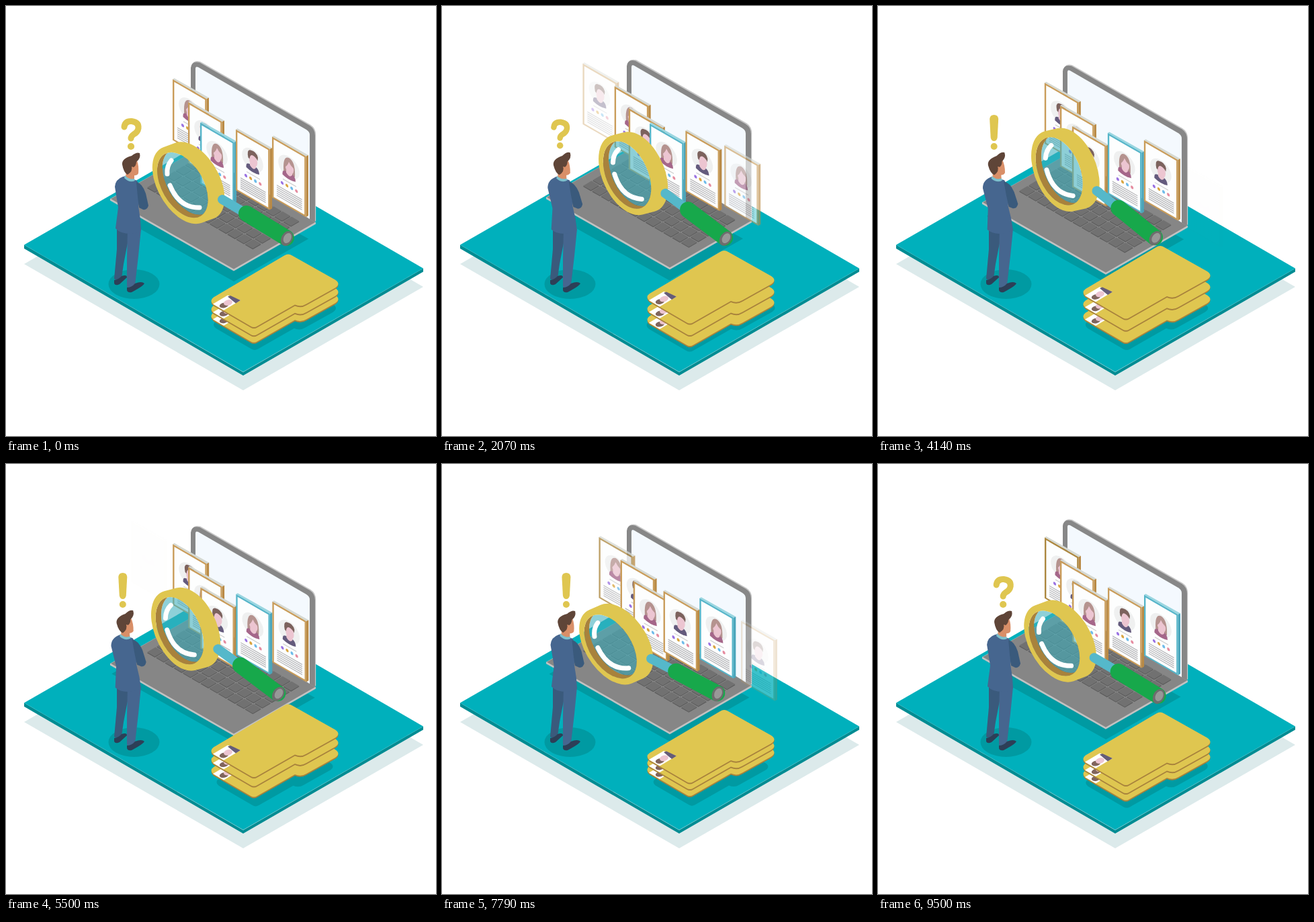
An HTML page that plays this animation: 640 px wide and 640 px high, repeating every 9.57 s.

```html
<!DOCTYPE html>
<html lang="en">
<head>
<meta charset="utf-8">
<title>Candidate search</title>
<style>
  html, body { margin: 0; width: 100%; height: 100%; overflow: hidden; background: #fff; }
  svg { display: block; width: 100vw; height: 100vh; }
</style>
</head>
<body>
<svg id="stage" viewBox="0 0 640 640"></svg>
<script>
const LOOP = 9570, FPS = 14;
const GOLD = '#dfc650', DARK_GOLD = '#a8823c', SHADE = '#009aa2';
const stage = document.getElementById('stage');

const poly = (points, fill) => `<polygon points="${points}" fill="${fill}"/>`;
const path = (d, fill) => `<path d="${d}" fill="${fill}"/>`;
const line = (d, color, width, cap = 'round') =>
  `<path d="${d}" fill="none" stroke="${color}" stroke-width="${width}" stroke-linecap="${cap}" stroke-linejoin="round"/>`;
const oval = (x, y, rx, ry, fill, turn = 0) =>
  `<ellipse cx="${x}" cy="${y}" rx="${rx}" ry="${ry}" fill="${fill}" transform="rotate(${turn} ${x} ${y})"/>`;
const group = (id, body) => `<g id="${id}">${body}</g>`;

function floor() {
  return poly('27,384 295,230 621,418 353,572', '#dceaeb')
    + poly('27,355.5 353,545 621,390.5 621,395.5 353,550 27,361', '#008c93')
    + poly('27,355.5 295,201.5 621,390.5 353,544.5', '#00b0bc')
    + oval(190.5, 414, 38, 22, SHADE);
}

function keyboard() {
  let keys = '';
  for (let row = 0; row < 5; row++) {
    for (let col = 0; col < 12; col++) {
      const x = 209 + col * 13.25 + row * 14.2;
      const y = 270 + col * 7.67 - row * 8.4;
      keys += `M${x + 1},${y}l11.6,6.7 12.4,-7.3 -11.6,-6.7z`;
    }
  }
  return `<path d="${keys}" transform="translate(0 1.1)" fill="#595959"/>` + path(keys, '#717171');
}

function laptop() {
  const lid = 'M275,222V92Q276,81 288,84L452,178Q460,183 460,193V322Z';
  return poly('155,287 277,218 461,322 461,324.5 339,394.5 155,289.5', '#c2c2c2')
    + poly('156,287 277,218 460,322 339,391.5', '#868686')
    + `<g transform="translate(1.2 -1.3)">${path(lid, '#c6c6c6')}</g>`
    + path(lid, '#878787')
    + path('M282,213V93Q282,89 286,91L447,184Q452,187 452,192V317Z', '#f4f9fe')
    + keyboard();
}

function portrait(woman) {
  const hair = woman ? '#b5938f' : '#7c625d';
  const back = woman ? path('M17.5,44Q15,19 25,17Q35,17 34,40L32,43Z', hair) : '';
  const fringe = woman
    ? 'M19,34Q18,18 26,19Q33,20 32,29Q27,27 25,23Q23,30 19,34Z'
    : 'M18.5,31Q16,20 22,18Q31,15 33,23L32.5,28Q30,24 25,24Q21,25 20.5,32Z';
  return back
    + path('M15.5,47Q15,40 20,39.5L31,39Q35,41 35,47Q25,51 15.5,47Z', woman ? '#a5678a' : '#645b7d')
    + path('M21,37H30V40Q26,47 21,41Z', '#ecc5d1')
    + oval(26, 31.5, 6.2, 8.8, '#ecc5d1')
    + path(fringe, hair);
}

function card(index) {
  const blue = index === 2;
  const frame = blue ? '#55b5c9' : index === -2 ? '#ac873f' : '#c99c59';
  const dots = ['#9a72e2', '#d9a540', '#6fbbe9', '#e58ca0'];
  let face = `<rect width="50.5" height="90.5" fill="${frame}"/>`
    + '<rect x="2.4" y="2.6" width="45.8" height="85.6" fill="#fdfefe"/>'
    + oval(25, 31, 15.8, 16, '#eff0f0') + portrait(index % 2 === 0)
    + line('M16,53.5H36', '#c9c9c9', 1.2, 'butt');
  dots.forEach((color, i) => face += oval(15 + i * 7.1, 60, 2.1, 2.3, color));
  for (let i = 0; i < 6; i++) face += line(`M7,${68 + i * 3}H44.5`, '#b5b5b8', 1.4, 'butt');
  return group('card' + index,
    poly('0,0 2.5,-1.5 54,27.5 50.5,29.2', blue ? '#9ad6e0' : '#d5d9d3')
    + poly('50.5,29.2 54,27.5 54,117.5 50.5,119.7', blue ? '#4aa6bb' : '#b98a45')
    + `<g transform="matrix(1 .577 0 1 0 0)">${face}</g>`);
}

function man() {
  const suit = '#46668f', dark = '#3a5a7c', shoe = '#2d3f57', hair = '#5f4538', skin = '#d98f68';
  const legs = path('M165,328L185,334L180,358L175,384L172,405Q166,410 161,406L165,362Z', dark)
    + path('M161,408Q168,407 172,402Q180,399 180,404L169,414Q163,417 161,413Z', shoe)
    + path('M181,330L201,332L197,372L192,415Q185,421 180,418L180,376Z', suit)
    + path('M180,419Q187,419 192,413Q202,409 206,413Q204,417 187,426Q181,427 180,423Z', shoe);
  const body = path('M178,253Q163,256 162,269L167,300L163,331Q170,339 186,339Q196,339 201,334L200,318L197,298L202,275L195,260Z', suit)
    + path('M194,262Q203,264 208,279L212,297Q210,304 204,303L198,300L196,284Z', dark)
    + path('M179,246L191,249V258Q184,262 178,254Z', skin)
    + path('M177,252Q183,259 191,257L192,260Q184,264 176,256Z', '#7cc0cd')
    + path('M184,236L195,230Q198,238 197,249Q195,253 188,252L183,247Z', skin)
    + path('M173,236Q172,227 187,223Q194,217 199,219Q201,227 194,232Q194,237 190,240L187,239Q189,246 181,251Q175,248 173,236Z', hair);
  return legs + group('body', body);
}

function marks() {
  return group('ask', line('M176,180Q177,171 187,171.5Q198,173 197,182Q196,188 190,191Q186,194 186,197', GOLD, 9)
      + oval(186, 209, 5.1, 5, GOLD))
    + group('shout', path('M179.5,168Q180,162 186,162Q192,162 192.5,168L191,196Q190,201 186,201Q182,201 181,196Z', GOLD)
      + oval(186, 209, 5, 5, GOLD));
}

// The ring is a capsule in a skewed plane, so its depth is one thick round line.
function magnifier() {
  const plane = 'transform="matrix(.87 .5 0 1 262.8 266.5)"';
  const hole = '<circle r="43.5"';
  return `<defs><clipPath id="hole">${hole}/></clipPath>
    <mask id="cut" maskUnits="userSpaceOnUse" x="-90" y="-90" width="200" height="200">
      <rect x="-90" y="-90" width="200" height="200" fill="#fff"/>${hole} fill="#000"/></mask></defs>
    <g ${plane}>
      <g clip-path="url(#hole)">
        <circle cx="9" cy="-9" r="43.5" fill="#44b1be" fill-opacity=".6"/>
        <path fill="${DARK_GOLD}" fill-rule="evenodd" d="M-60,-60H60V60H-60ZM-34.5,-9a43.5,43.5 0 1 0 87,0a43.5,43.5 0 1 0 -87,0Z"/>
      </g>
    </g>`
    + line('M240,250Q239,238 246,230', '#fff', 7)
    + line('M244,267Q258,301 288,300', '#fff', 7)
    + `<g ${plane}><g mask="url(#cut)">${line('M0,0L20.2,-16.6', GOLD, 103.4)}</g></g>`
    + line('M322,288L356,308', '#55b8ca', 14)
    + line('M358,309L417,345', '#17a84b', 24)
    + oval(418, 346, 8.2, 11.5, '#6d6d6d', 27) + oval(418.8, 345.5, 5.5, 8, '#989898', 27);
}

const FOLDER = 'M309,433L414,371Q420,367 426,371L490,407Q499,413 490,419L447,443Q439,448 430,444L374,476Q369,479 364,476L309,444Q302,438 309,433Z';

function folder(id) {
  return group(id, `<g transform="translate(0 2)">${path(FOLDER, DARK_GOLD)}</g>`
    + path(FOLDER, GOLD)
    + poly('308,443 330,430 349,437.5 324,452.5', '#fff')
    + poly('330,432 334,430.5 349,437.5 342,442 337,438', '#655c78')
    + oval(324.5, 445, 6.8, 3.8, '#80655d', -12)
    + oval(330.5, 441, 6.6, 4.2, '#ecc5d1', -15));
}

const indexes = [-2, -1, 0, 1, 2, 3, 4];
stage.innerHTML = floor()
  + group('baseShade', poly('163,313 277,248 454,347 340,412', SHADE))
  + group('laptop', laptop() + indexes.map(card).join(''))
  + group('lens', magnifier())
  + man() + marks()
  + group('fileShade', path(FOLDER, SHADE))
  + folder('file2') + folder('file1') + folder('file0');

const parts = {};
stage.querySelectorAll('g[id]').forEach(g => parts[g.id] = g);
const place = (id, value) => parts[id].setAttribute('transform', value);

const wave = (t, peak) => Math.cos(2 * Math.PI * (t - peak) / LOOP);
const clamp = x => Math.min(1, Math.max(0, x));
const ramp = (t, a, b) => { const p = clamp((t - a) / (b - a)); return p * p * (3 - 2 * p); };
const cubic = (t, a, b) => {
  const p = clamp((t - a) / (b - a));
  return p < .5 ? 4 * p ** 3 : 1 - 4 * (1 - p) ** 3;
};

// Smooth closed curve through poses at the key times.
const KEYS = [0, 1140, 2930, 5500, 7000, 8710];
const TRACKS = {
  x: [271.5, 279.3, 286, 267.5, 256.5, 265.5],
  y: [263, 254, 246, 245.5, 267, 265],
  turn: [0, 2.7, 7.6, 5.6, -3.2, -1.8],
  lean: [0, -2.7, -4.8, -4.8, -1.2, 0]
};
function follow(name, t) {
  const v = TRACKS[name], n = KEYS.length;
  const time = i => KEYS[(i + n) % n] + Math.floor(i / n) * LOOP;
  const val = i => v[(i + n) % n];
  const slope = i => (val(i + 1) - val(i - 1)) / (time(i + 1) - time(i - 1));
  let i = n - 1;
  while (KEYS[i] > t) i--;
  const h = time(i + 1) - time(i), p = (t - time(i)) / h, q = 1 - p;
  return val(i) * q * q * (1 + 2 * p) + val(i + 1) * p * p * (3 - 2 * p)
    + h * p * q * (slope(i) * q - slope(i + 1) * p);
}

const SLOTS = [[186, 75], [248, 109], [271, 143], [289, 173.7], [342, 183.7], [396, 194.5], [460, 235]];

function moveCards(t) {
  const shift = cubic(t, 0, 4550) + cubic(t, 4980, LOOP);
  for (const index of indexes) {
    const at = index + 1 + shift;
    const alpha = clamp(Math.min(at, 6 - at));
    const i = Math.min(5, Math.max(0, Math.floor(at))), p = at - i;
    const [x, y] = SLOTS[i].map((a, k) => a + (SLOTS[i + 1][k] - a) * p);
    place('card' + index, `translate(${x} ${y})`);
    parts['card' + index].setAttribute('opacity', alpha);
  }
}

function draw(t) {
  const hover = -6.9 * wave(t, 1465);
  place('laptop', `translate(0 ${hover + 4})`);
  place('baseShade', `translate(308 330) scale(${1 + .0065 * hover}) translate(-308 -330)`);
  moveCards(t);

  place('lens', `translate(${follow('x', t)} ${follow('y', t)}) rotate(${follow('turn', t)}) translate(-271.5 -263)`);

  const lean = follow('lean', t);
  place('body', `rotate(${lean} 183 336)`);
  const drift = 146 * Math.sin(lean * Math.PI / 180);
  const ask = 1 - ramp(t, 2000, 2450) + ramp(t, 8370, 9000);
  const shout = ramp(t, 2450, 3050) - ramp(t, 7900, 8370);
  const pop = s => `translate(${186 + drift} 190) scale(${s}) translate(-186 -190)`;
  place('ask', pop(ask));
  place('shout', pop(shout));

  const low = 6.5 * wave(t, 2100);
  place('file0', `translate(0 ${-6 + 6.5 * wave(t, -100)})`);
  place('file1', `translate(0 ${8 + 6 * wave(t, 1000)})`);
  place('file2', `translate(0 ${22 + low})`);
  place('fileShade', `translate(400 459) scale(${.952 + .009 * low}) translate(-400 -422.5)`);
}

const start = performance.now();
function tick() {
  const t = (performance.now() - start) % LOOP;
  draw(Math.floor((t + 5) * FPS / 1000) * 1000 / FPS % LOOP);
  requestAnimationFrame(tick);
}
draw(0);
requestAnimationFrame(tick);
</script>
</body>
</html>
```
